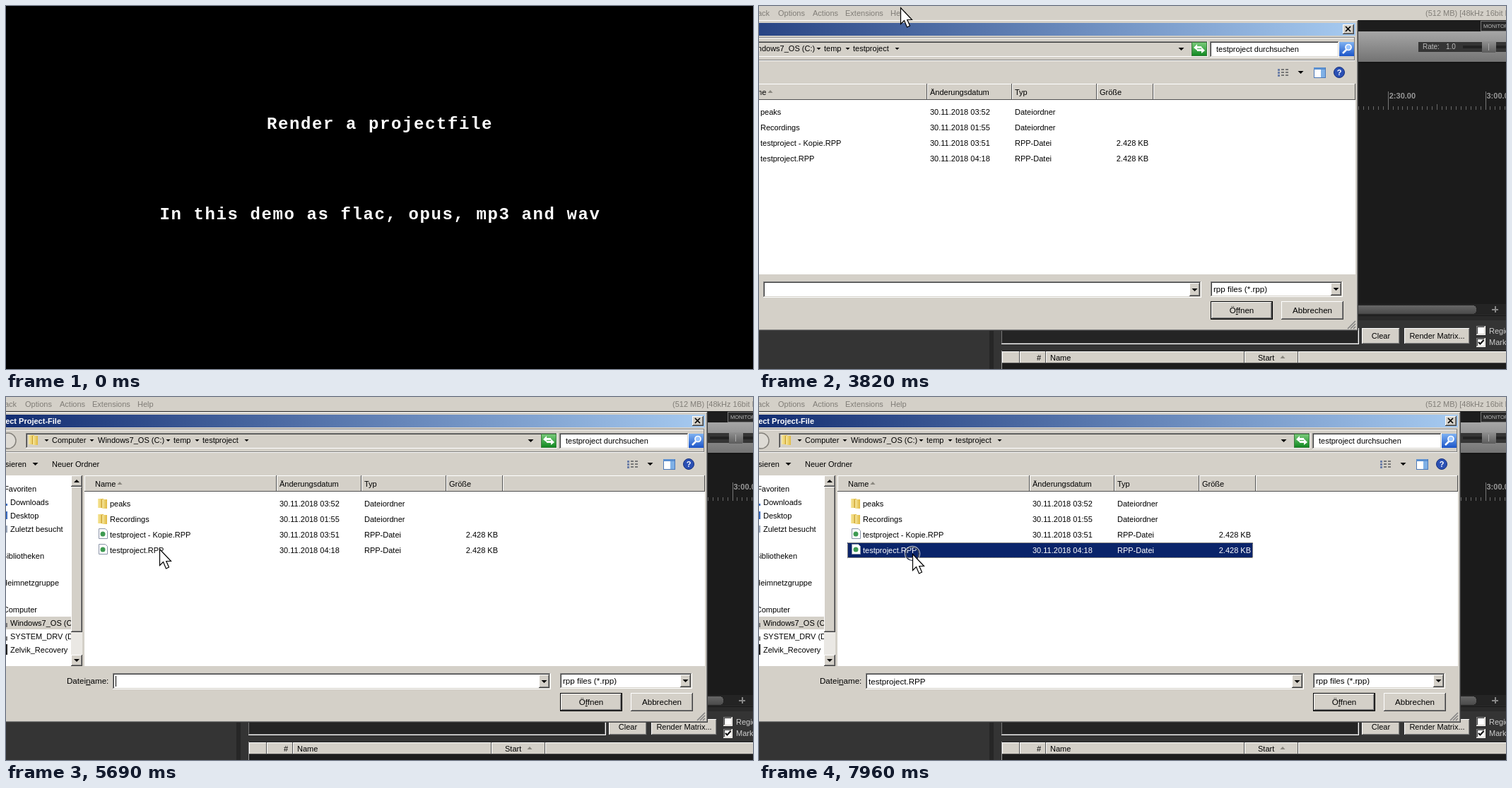
Write an HTML page that moves like this. It is 1057x514 px and loops after 8000 ms.

```html
<!DOCTYPE html>
<html lang="de">
<head>
<meta charset="utf-8">
<title>Render demo</title>
<style>
  html, body { margin: 0; width: 100%; height: 100%; overflow: hidden; background: #000; }
  svg { display: block; }
  text { font: 11px "Liberation Sans", Arial, sans-serif; white-space: pre; }
  rect { shape-rendering: crispEdges; }
  .b { font-weight: bold; }
  .big { font-size: 11.6px; }
  .end { text-anchor: end; }
  .mid { text-anchor: middle; }
  .intro { font: bold 24px "Liberation Mono", monospace; letter-spacing: 1.6px; }
  .row .mark { visibility: hidden; }
  .row.sel .mark { visibility: visible; }
  .row.sel text { fill: #fff; }
</style>
</head>
<body>
<svg id="stage" width="1057" height="514" viewBox="0 0 1057 514"></svg>
<script>
const FACE = '#d4d0c8';

const box = (x, y, w, h, fill, extra = '') =>
  `<rect x="${x}" y="${y}" width="${w}" height="${h}" fill="${fill}" ${extra}/>`;
const label = (x, y, s, fill = '#000', cls = '', extra = '') =>
  `<text x="${x}" y="${y}" fill="${fill}" class="${cls}" ${extra}>${s}</text>`;
const shape = (d, fill, extra = '') => `<path d="${d}" fill="${fill}" ${extra}/>`;
const line = (d, color, width = 1) =>
  shape(d, 'none', `stroke="${color}" stroke-width="${width}"`);
const group = (id, s, extra = '') => `<g id="${id}" ${extra}>${s}</g>`;
const down = (x, y, r = 3) => shape(`M${x - r} ${y}h${2 * r}l${-r} ${r}z`, '#000');
const sortMark = (x, y) => shape(`M${x - 3.5} ${y + 2}h7l-3.5-4z`, '#8a877f');
const count = (n, f) => Array.from({ length: n }, (_, i) => f(i)).join('');

const raised = (x, y, w, h, fill = FACE) =>
  box(x, y, w, h, '#404040') + box(x, y, w - 1, h - 1, '#fff') +
  box(x + 1, y + 1, w - 2, h - 2, '#808080') + box(x + 1, y + 1, w - 3, h - 3, fill);
const sunken = (x, y, w, h, fill = '#fff') =>
  box(x, y, w, h, '#fff') + box(x, y, w - 1, h - 1, '#808080') +
  box(x + 1, y + 1, w - 2, h - 2, FACE) + box(x + 1, y + 1, w - 3, h - 3, '#404040') +
  box(x + 2, y + 2, w - 4, h - 4, fill);
const header = (edges, y, h) => edges.slice(1).map((e, i) => {
  const x = edges[i], w = e - x;
  return box(x, y, w, h, '#505050') + box(x, y, w - 1, h - 1, '#fff') +
    box(x + 1, y + 1, w - 2, h - 2, FACE);
}).join('');

const gradient = (id, colors, dir) =>
  `<linearGradient id="${id}" ${dir}>` + colors.map((c, i) =>
    `<stop offset="${i / (colors.length - 1)}" stop-color="${c}"/>`).join('') + '</linearGradient>';
const VERTICAL = 'x1="0" y1="0" x2="0" y2="1"';

const defs = '<defs>' +
  gradient('metal', ['#a6a6a6', '#8c8c8c', '#727272'], VERTICAL) +
  gradient('button', ['#444', '#272727'], VERTICAL) +
  gradient('thumb', ['#666', '#4a4a4a'], VERTICAL) +
  gradient('knob', ['#909090', '#5c5c5c'], VERTICAL) +
  gradient('caption', ['#0a246a', '#a6caf0'],
    'gradientUnits="userSpaceOnUse" x1="-60" y1="0" x2="989" y2="0"') +
  gradient('folder', ['#f8e9a0', '#dfb83f'], 'x1="0" y1="0" x2="1" y2="0"') +
  gradient('go', ['#7fce7f', '#128a22'], VERTICAL) +
  gradient('find', ['#7fb2f2', '#1c55c8'], VERTICAL) +
  '<clipPath id="treeClip"><rect x="-200" y="111" width="292" height="270"/></clipPath></defs>';

function introView() {
  return box(0, 0, 1057, 514, '#000') +
    label(369, 174, 'Render a projectfile', '#fff', 'intro') +
    label(217.5, 302, 'In this demo as flac, opus, mp3 and wav', '#fff', 'intro');
}

function transport() {
  const ink = '#d0d0d0';
  return box(240, 43, 488, 30, '#141414', 'rx="5"') +
    box(241, 44, 244, 28, 'url(#button)', 'rx="4"') +
    box(485, 44, 242, 28, '#272727', 'rx="4"') +
    count(7, i => box([275, 310, 345, 380, 415, 450, 484][i], 44, 1, 28, '#101010')) +
    shape('M251 52h2.5v12h-2.5zM266 52v12l-12-6z', ink) +
    box(287, 52, 12, 12, ink) +
    shape('M322 52v12l12-6z', ink) +
    box(357, 52, 4, 12, ink) + box(365, 52, 4, 12, ink) +
    shape('M391 52v12l12-6zM403.5 52h2.5v12h-2.5z', ink) +
    line('M428 60a5.5 5.5 0 0 1 6-7.500M438.500 56a5.500 5.500 0 0 1-6 7.500', ink, 2) +
    shape('M433 49l5 3.500l-5 3.500zM433.500 60v7l-5-3.500z', ink) +
    '<circle cx="468" cy="58" r="7.5" fill="#a32a2a" stroke="#111"/>' +
    label(526, 64, '0:00.000', '#ddd', 'b', 'style="font-size:18px"') +
    label(652, 62, '[Stopped]', '#c8c8c8');
}

function tools() {
  const c = '#c4c4c4';
  return box(5, 98, 121, 28, '#0d0d0d', 'rx="4"') +
    count(4, i => box(7 + i * 30, 99, 28, 26, 'url(#button)', 'rx="3"')) +
    line('M10 107h7.500v10h-7.500M31 107h-7.500v10h7.500M10 112h7M24 112h7', c) +
    line('M20.5 102v20', '#888') +
    count(2, i => line(`M${47 + i * 30} 103.500h-5.500v18M${54 + i * 30} 103.500h5.500v18`, c, 1.5)) +
    shape('M47 106l8 8l-4 .5l3 6l-2 1l-3-6l-2 3z', c) +
    line('M76 107l7 12M85 107l-7 12', c, 1.5) +
    line('M99 109h6l10 8h7', c) +
    shape('M105 105l4 4l-4 4l-4-4zM114 112l4 4l-4 4l-4-4z', c);
}

function appView() {
  const step = 137.75;
  const menu = [[27, 'Options'], [76, 'Actions'], [122, 'Extensions'], [186, 'Help'],
    [943, '(512 MB) [48kHz 16bit FLAC']];
  const tabs = [[15, 'dingodo.RPP'], [91, 'rec1-1-2-mix-proc-1-1.RPP'], [237, 'testproject.RPP']];
  return box(0, 0, 1057, 514, '#2a2a2a') +
    box(0, 0, 1057, 20, FACE) +
    label(15, 14, 'Track', '#807d77', 'end') +
    menu.map(([x, s]) => label(x, 14, s, '#807d77')).join('') +
    box(0, 20, 1057, 16, '#1d1d1d') +
    shape('M310 36l6-15h86l8 15z', '#303030') +
    tabs.map(([x, s]) => label(x, 32, s, '#c8c8c8')).join('') +
    line('M326.5 24.5h8v8h-8zM328 26l5 5M333 26l-5 5', '#ccc') +
    label(338, 32, '[Unsaved]', '#eee', 'b') +
    box(0, 36, 1057, 44, 'url(#metal)') + box(0, 79, 1057, 2, '#161616') +
    box(1021, 21, 40, 14, '#292929', 'stroke="#777"') +
    label(1025, 31, 'MONITOR', '#bbb', '', 'style="font-size:7.5px"') +
    label(31, 69, 'ALL', '#111', 'b end', 'style="font-size:21px"') +
    label(40, 69, '3.1', '#111', 'b', 'style="font-size:19.5px"') +
    transport() +
    box(933, 51, 124, 14, '#353535') + box(996, 56, 61, 4, '#222') +
    label(939, 61, 'Rate:', '#bbb', '', 'style="font-size:10px"') +
    label(972, 61, '1.0', '#bbb', '', 'style="font-size:10px"') +
    box(1023, 50, 20, 16, 'url(#knob)', 'rx="2"') + box(1032, 53, 1, 10, '#aaa') +
    tools() +
    box(0, 147, 194, 274, '#343434') + box(0, 146, 194, 1, '#222') + box(194, 147, 1, 274, '#222') +
    box(200, 81, 857, 341, '#1b1b1b') +
    count(125, i => {
      const h = i % 20 ? i % 10 ? 5 : 8 : 26;
      return box(Math.round(201 + i * step / 20), 147 - h, 1, h, i % 20 ? '#686868' : '#777');
    }) +
    ['0:00.00', '0:30.00', '1:00.00', '1:30.00', '2:00.00', '2:30.00', '3:00.00'].map((s, i) =>
      label(204 + i * step - (i ? 1 : 0), 131, s, '#989898', 'b')).join('') +
    box(201, 122, 1, 300, '#e6a73c') + shape('M201 122h9l-9 9z', '#e6a73c') +
    box(200, 422, 857, 15, '#242424') + box(219, 424, 796, 12, 'url(#thumb)', 'rx="5"') +
    box(1037, 429, 9, 2, '#888') + box(1041, 425, 2, 9, '#888') +
    box(0, 438, 1057, 1, '#191919') +
    box(0, 445, 326, 69, '#343434') + box(326, 445, 6, 69, '#262626') + box(332, 445, 725, 69, '#343434') +
    box(343, 456, 506, 23, '#fff') + box(343, 456, 505, 22, '#777') + box(344, 457, 503, 20, '#242424') +
    raised(853, 456, 54, 23) + label(880, 471, 'Clear', '#000', 'mid') +
    raised(913, 456, 93, 23) + label(959.5, 471, 'Render Matrix...', '#000', 'mid') +
    sunken(1015, 453, 13, 13) + sunken(1015, 470, 13, 13) +
    line('M1018 476l2.5 2.5l5-5.5', '#000', 2) +
    label(1033, 464, 'Regions', '#ccc') + label(1033, 480, 'Markers', '#ccc') +
    box(343, 488, 714, 26, '#1c1c1c') + box(343, 488, 1, 26, '#999') +
    header([344, 369, 406, 687, 763, 1070], 489, 17) +
    label(393, 502, '#') + label(412, 502, 'Name') + label(706, 502, 'Start') + sortMark(741, 497);
}

const folderIcon = (x, y) =>
  box(x, y + 1, 8, 13, 'url(#folder)', 'rx="1"') + box(x + 6, y + 2, 7, 13, 'url(#folder)', 'rx="1"') +
  box(x + 5, y + 2, 1, 12, '#c79c2d');
const fileIcon = (x, y) =>
  shape(`M${x + .5} ${y + .5}h9l3 3v11h-12z`, '#fff', 'stroke="#8a94a8"') +
  `<circle cx="${x + 6}" cy="${y + 8}" r="3.5" fill="#3f9a52"/>`;

function fileRow(i, name, date, type, size) {
  const y = 140 + i * 22;
  return group('row' + i,
    box(125, y, 574, 22, '#0a246a', 'class="mark"') +
    box(125.5, y + .5, 573, 21, 'none', 'class="mark" stroke="#f5db95" stroke-dasharray="1 1"') +
    (size ? fileIcon(131, y + 2) : folderIcon(130, y + 3)) +
    label(147, y + 15, name) + label(387, y + 15, date) + label(507, y + 15, type) +
    label(696, y + 15, size, '#000', 'end'), 'class="row"');
}

function tree() {
  const heads = [[43, 134, 'Favoriten'], [54, 229, 'Bibliotheken'], [75, 267, 'Heimnetzgruppe'], [44, 305, 'Computer']];
  const items = [[153, 'Downloads'], [172, 'Desktop'], [191, 'Zuletzt besucht'],
    [324, 'Windows7_OS (C:)'], [343, 'SYSTEM_DRV (D:)'], [362, 'Zelvik_Recovery']];
  return box(-200, 111, 292, 270, '#fff') + box(-200, 311, 292, 18, FACE) +
    '<g clip-path="url(#treeClip)">' +
    heads.map(([x, y, s]) => label(x, y, s, '#000', 'end')).join('') +
    items.map(([y, s]) => label(6, y, s)).join('') + '</g>' +
    box(0, 162, 2, 11, '#3c6cc0') + box(0, 182, 2, 10, '#9aa6b8') + box(0, 151, 2, 3, '#3c6cc0') +
    box(0, 320, 2, 6, '#777') + box(0, 339, 2, 6, '#777') +
    box(0, 350, 2, 15, '#222') +
    box(92, 111, 16, 270, '#eae8e4') +
    raised(92, 111, 16, 16) + shape('M96 121h8l-4-4z', '#000') +
    raised(92, 127, 16, 206) + raised(92, 365, 16, 16) + down(100, 371, 4);
}

function dialogView() {
  const crumbs = [[65, 'Computer'], [130, 'Windows7_OS (C:)'], [237, 'temp'], [278, 'testproject']];
  return raised(-200, 21, 1193, 440) +
    box(-200, 25, 1189, 18, 'url(#caption)') +
    label(78, 38, 'Select Project-File', '#fff', 'b end') +
    raised(971, 27, 16, 14) + line('M975 30l7 7M982 30l-7 7', '#000', 1.7) +
    box(-200, 45, 1188, 1, '#808080') + box(-200, 46, 1188, 1, '#fff') +
    box(-200, 77, 1188, 1, '#808080') + box(-200, 78, 1188, 1, '#fff') +
    box(987, 45, 1, 33, '#808080') +
    '<circle cx="3" cy="62" r="11" fill="#dedbd5" stroke="#85827c" stroke-width="1.5"/>' +
    sunken(28, 51, 752, 22, FACE) + folderIcon(32, 53) +
    crumbs.map(([x, s]) => label(x, 65, s)).join('') +
    [57.5, 121.5, 229.5, 270.5].map(x => down(x, 60)).join('') +
    group('tailArrow', down(340.5, 60)) + down(742.5, 60, 4) +
    box(757, 52, 21, 19, 'url(#go)', 'stroke="#3a7a3a"') +
    shape('M760 60l5-5v3h6v3h-6v3zM776 64l-5-5v3h-6v3h6v3z', '#fff') +
    sunken(783, 51, 183, 23) + label(792, 66, 'testproject durchsuchen') +
    box(966, 52, 21, 20, 'url(#find)') +
    '<circle cx="979" cy="59.5" r="4" fill="#9cc6ff" stroke="#fff" stroke-width="1.7"/>' +
    line('M976 63l-5 5', '#fff', 2.5) +
    label(29, 99, 'Organisieren', '#000', 'end') + down(41.5, 93, 4) + label(65, 99, 'Neuer Ordner') +
    count(3, i => box(879, 90 + i * 4, 3, 3, '#6d7fa8') + box(884, 90 + i * 4, 4, 2, '#777') +
      box(890, 90 + i * 4, 4, 2, '#777')) +
    down(911.5, 93, 4) +
    box(930, 88, 16, 14, '#fff', 'stroke="#4a78b8"') + box(930, 88, 16, 3, '#5a8fd0') + box(940, 91, 6, 11, '#7fb0e6') +
    '<circle cx="966" cy="95" r="7.5" fill="#2b50b4" stroke="#16307c"/>' +
    label(966, 99, '?', '#fff', 'b mid') +
    tree() +
    box(108, 111, 3, 270, FACE) + box(111, 111, 878, 270, '#fff') +
    header([111, 383, 503, 623, 703, 989], 111, 23) +
    [[126, 'Name'], [387, 'Änderungsdatum'], [507, 'Typ'], [627, 'Größe']].map(([x, s]) => label(x, 127, s)).join('') +
    sortMark(161, 122) +
    fileRow(0, 'peaks', '30.11.2018 03:52', 'Dateiordner', '') +
    fileRow(1, 'Recordings', '30.11.2018 01:55', 'Dateiordner', '') +
    fileRow(2, 'testproject - Kopie.RPP', '30.11.2018 03:51', 'RPP-Datei', '2.428 KB') +
    fileRow(3, 'testproject.RPP', '30.11.2018 04:18', 'RPP-Datei', '2.428 KB') +
    label(86, 406, 'Datei<tspan text-decoration="underline">n</tspan>ame:', '#000', 'big') +
    sunken(151, 391, 620, 23) + raised(754, 393, 15, 19) + down(761.5, 401, 4) +
    label(155, 407, '', '#000', 'big', 'id="fileName"') +
    box(155, 395, 1, 15, '#000', 'id="caret"') +
    sunken(784, 391, 187, 22) + raised(954, 393, 15, 18) + down(961.5, 400, 4) +
    label(788, 406, 'rpp files (*.rpp)', '#000', 'big') +
    box(784, 419, 88, 26, '#000') + raised(785, 420, 86, 24) +
    label(828, 436, 'Ö<tspan text-decoration="underline">f</tspan>fnen', '#000', 'big mid') +
    raised(884, 419, 88, 26) + label(928, 436, 'Abbrechen', '#000', 'big mid') +
    line('M978 458l11-11M982 458l7-7M986 458l3-3', '#808080', 1.5);
}

const pointerView =
  group('ring', '<circle r="10" fill="none" stroke="#fff" stroke-opacity=".65" stroke-width="2.5"/>' +
    '<circle r="9.5" fill="none" stroke="#1c2438" stroke-width="1.2"/>') +
  shape('M.5 .5V23.5L5.5 18.5L9.5 28L13.5 26L9.8 17.5H16.5Z', '#fff',
    'stroke="#000" stroke-width="1.2"');

document.getElementById('stage').innerHTML = defs + group('app', appView()) +
  group('dialog', dialogView()) + group('pointer', pointerView) + group('intro', introView());

const el = id => document.getElementById(id);
const show = (id, on) => el(id).setAttribute('visibility', on ? 'inherit' : 'hidden');
const display = (id, on) => { el(id).style.display = on ? '' : 'none'; };
const between = (t, a, b) => t >= a && t < b;

// time, x, y of the pointer
const PATH = [
  [3270, 576, 446], [3800, 200, 2], [4000, 150, 8], [4350, 134, 28], [4430, 134, 28],
  [4700, 260, 30], [4810, 260, 30], [4880, 279, 30], [4980, 279, 30], [5600, 217, 215],
  [5800, 217, 215], [6140, 217, 202], [6300, 217, 202], [6500, 221, 197],
  [7330, 221, 197], [7490, 217, 222]
];
const TICK = 90, FIRST_TICK = 3270;
const BLINKS = [2830, 3280, 3730, 4270, 4880, 5330, 5870, 6330, 6870];
const DROP = 4880, PICK_COPY = 7050, PICK_FILE = 7870;

function pointerAt(t) {
  const i = PATH.findIndex(p => p[0] > t);
  if (i < 0) return PATH[PATH.length - 1].slice(1);
  if (!i) return PATH[0].slice(1);
  const a = PATH[i - 1], b = PATH[i];
  const u = (t - a[0]) / (b[0] - a[0]), k = u * u * (3 - 2 * u);
  return [1, 2].map(n => Math.round(a[n] + (b[n] - a[n]) * k));
}

function draw(t) {
  display('intro', t < 500);
  display('dialog', t >= 2560);
  el('dialog').setAttribute('transform', t < DROP ? 'translate(-145 -1)' : '');
  show('tailArrow', t >= 2920);
  show('caret', BLINKS.filter(b => t >= b).length % 2 === 0 && t < PICK_COPY);

  const copy = between(t, PICK_COPY, PICK_FILE), file = t >= PICK_FILE;
  el('row2').classList.toggle('sel', copy);
  el('row3').classList.toggle('sel', file);
  el('fileName').textContent = file ? 'testproject.RPP' : copy ? 'testproject - Kopie.RPP' : '';

  display('pointer', t >= FIRST_TICK);
  const tick = FIRST_TICK + Math.floor((t - FIRST_TICK) / TICK) * TICK;
  el('pointer').setAttribute('transform', `translate(${pointerAt(tick)})`);
  show('ring', between(t, 4360, DROP) || between(t, PICK_COPY, 7140) || file);
}

const start = performance.now();
function loop() {
  draw((performance.now() - start) % 8000);
  requestAnimationFrame(loop);
}
loop();
</script>
</body>
</html>
```
